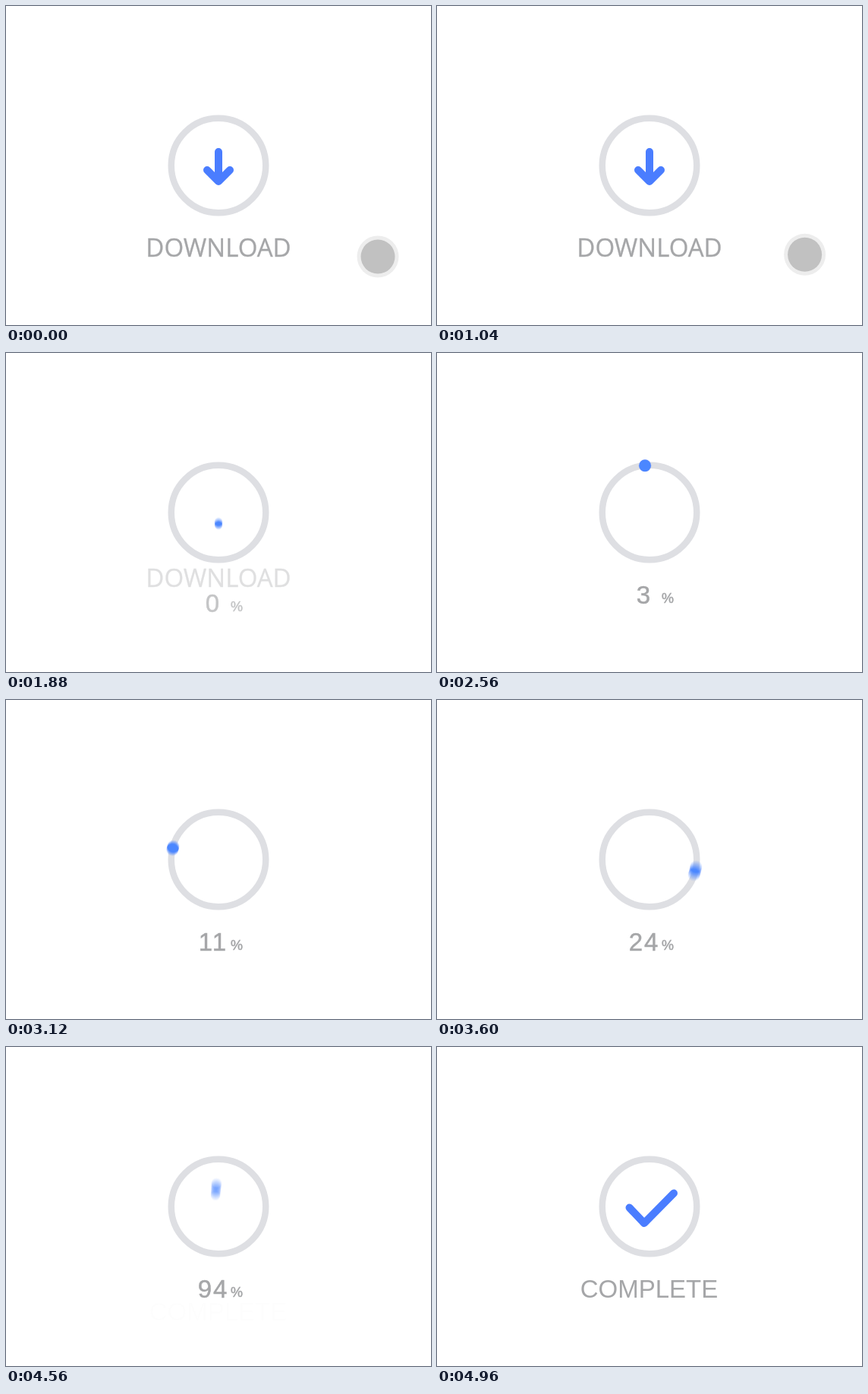
Animation of 560x420 px, one loop 5.4 s. Source, as an HTML page:

```html
<!DOCTYPE html>
<html lang="en">
<head>
<meta charset="utf-8">
<title>Download button</title>
<style>
  html, body { margin: 0; width: 100%; height: 100%; overflow: hidden; background: #fff; }
  svg { display: block; width: 560px; height: 420px; }
  text { fill: #a5a6a8; font: 33px "Liberation Sans", Arial, sans-serif; text-anchor: middle; }
  .stroke { fill: none; stroke: #4a7dff; stroke-width: 10; stroke-linecap: round; stroke-linejoin: round; }
  #download { font-family: "Open Sans", "Noto Sans", sans-serif; stroke: #a5a6a8; stroke-width: .3; }
  #progress text { stroke: #a5a6a8; stroke-width: .5; }
  #progress .unit { font-size: 18px; }
  #count { letter-spacing: 2px; }
  #dot { isolation: isolate; }
  #dot circle { fill: #4a7dff; mix-blend-mode: plus-lighter; }
</style>
</head>
<body>
<svg viewBox="0 0 560 420">
  <circle id="ring" cx="280" cy="210" r="62.25" fill="none" stroke="#dedfe3" stroke-width="8.5"/>
  <path id="arrow" class="stroke"/>
  <path id="check" class="stroke"/>
  <g id="dot"></g>
  <text id="download" x="280" y="330" textLength="">DOWNLOAD</text>
  <g id="progress">
    <text id="count" x="273" y="330">0</text>
    <text class="unit" x="304" y="329">%</text>
  </g>
  <text id="complete" x="279.5" y="330">COMPLETE</text>
  <g id="cursor">
    <circle r="27.5" fill="#ededed" style="mix-blend-mode:multiply"/>
    <circle r="22.5" fill="#000" fill-opacity=".19"/>
  </g>
</svg>
<script>
const LOOP = 5400, STEP = 40, SAMPLES = 15, SHUTTER = 20;
const SPIN_START = 2160, SPIN_END = 4486;
const $ = id => document.getElementById(id);
const mix = (a, b, k) => a + (b - a) * k;
const smooth = k => k * k * (3 - 2 * k);
const easeOut = k => 1 - (1 - k) ** 3;
const ramp = (t, a, b, ease = smooth) => ease(Math.min(1, Math.max(0, (t - a) / (b - a))));

// Time and cube root of the percentage
const countKeys = [[1760, 0], [2560, 1.46], [3600, 2.9], [4160, 3.72], [4600, 4.64]];

$('download').removeAttribute('textLength');
const samples = Array.from({ length: SAMPLES }, () => {
  const c = document.createElementNS('http://www.w3.org/2000/svg', 'circle');
  c.setAttribute('opacity', 1 / SAMPLES);
  return $('dot').appendChild(c);
});

function set(id, attrs) {
  for (const name in attrs) $(id).setAttribute(name, attrs[name]);
}

function percent(t) {
  let root = 0;
  for (let i = 1; i < countKeys.length; i++) {
    const [a, from] = countKeys[i - 1], [b, to] = countKeys[i];
    if (t >= a) root = mix(from, to, ramp(t, a, b, k => k));
  }
  return Math.min(99, Math.floor(root ** 3));
}

function dotAt(t) {
  if (t < SPIN_START) {
    const k = ramp(t, 1840, 2080);
    return { x: 280, y: mix(231, 148, k), r: mix(5, 8, k) };
  }
  if (t < SPIN_END) {
    const angle = (0.00441 * (t - SPIN_START)) ** 3 * Math.PI / 180;
    return { x: 280 - 62 * Math.sin(angle), y: 210 - 62 * Math.cos(angle), r: 8 };
  }
  const k = ramp(t, SPIN_END, 4640);
  return { x: mix(280, 273, k), y: mix(148, 232, k), r: mix(8, 5, k) };
}

function slide(id, enter, leave) {
  set(id, {
    transform: `translate(0 ${30 * (1 - enter) - 34 * leave})`,
    opacity: enter * (1 - leave)
  });
}

function render(t) {
  const hover = ramp(t, 1320, 1560) * (1 - ramp(t, 1600, 1760));
  set('ring', { r: 62.25 + 4.25 * hover, 'stroke-width': 8.5 - .5 * hover });

  const stretch = ramp(t, 1320, 1560), fold = ramp(t, 1600, 1840);
  const top = mix(192 - 9 * stretch, 231, fold);
  const arm = (15 + 5 * stretch) * (1 - fold);
  set('arrow', {
    d: `M280 ${top}V231M${280 - arm} ${231 - arm}L280 231L${280 + arm} ${231 - arm}`,
    visibility: t < 1840 ? 'visible' : 'hidden'
  });

  const showDot = t >= 1840 && t < 4640;
  set('dot', { visibility: showDot ? 'visible' : 'hidden' });
  if (showDot) samples.forEach((c, i) => {
    const p = dotAt(t + SHUTTER * (i / (SAMPLES - 1) - .5));
    c.setAttribute('cx', p.x);
    c.setAttribute('cy', p.y);
    c.setAttribute('r', p.r);
  });

  const grow = 1.06 * ramp(t, 4640, 4880, easeOut) - .06 * ramp(t, 4880, 4960);
  set('check', {
    d: `M${273 - 19.5 * grow} ${232 - 20.5 * grow}L273 232L${273 + 39 * grow} ${232 - 39.5 * grow}`,
    visibility: t >= 4640 ? 'visible' : 'hidden'
  });

  const swapIn = ramp(t, 1640, 2040), swapOut = ramp(t, 4540, 4900);
  slide('download', 1, swapIn);
  slide('progress', swapIn, swapOut);
  slide('complete', swapOut, 0);
  $('count').textContent = percent(t);

  const move = ramp(t, 1000, 1400), press = ramp(t, 1440, 1560);
  const release = ramp(t, 1560, 1760);
  set('cursor', {
    transform: `translate(${mix(490, 297.5, move)} ${mix(330, 233, move)}) scale(${1 - .27 * press + .27 * release})`,
    opacity: 1 - release
  });
}

const start = performance.now();
function tick() {
  const t = (performance.now() - start) % LOOP;
  render(Math.floor(t / STEP) * STEP);
  requestAnimationFrame(tick);
}
tick();
</script>
</body>
</html>
```
